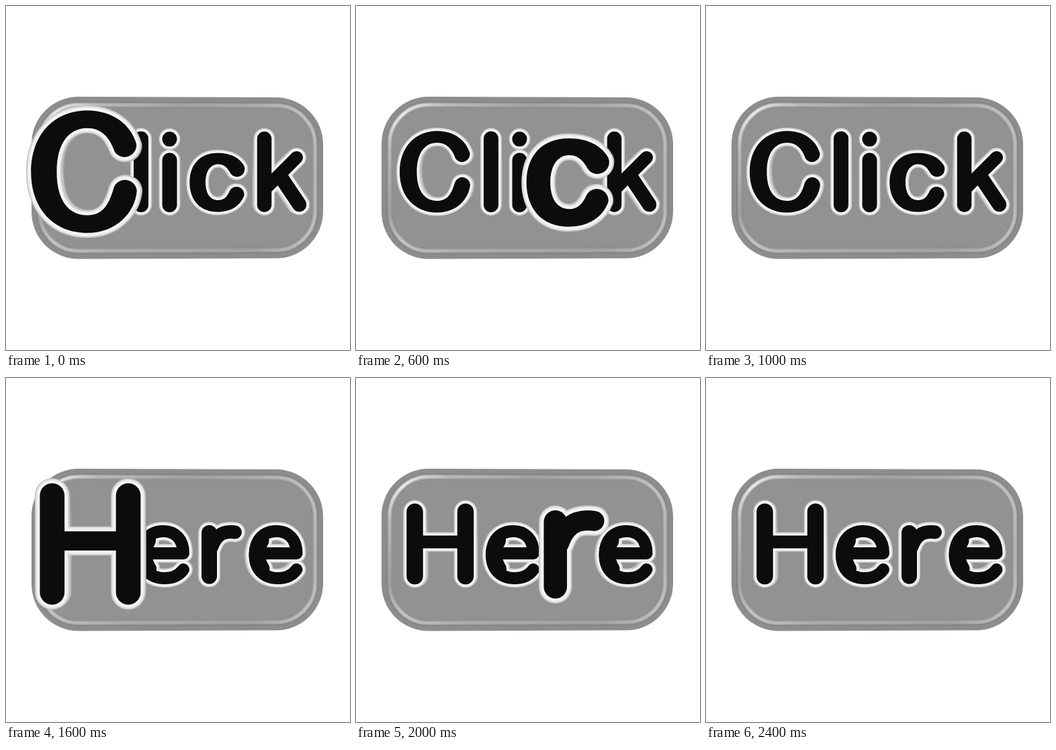
An HTML page with a canvas that plays this animation: 512x512 px, repeating every 3 s.

```html
<!DOCTYPE html>
<html lang="en">
<head>
<meta charset="utf-8">
<title>Click Here</title>
<style>
  html, body { margin: 0; width: 100%; height: 100%; overflow: hidden; background: #fff; }
  canvas { display: block; }
</style>
</head>
<body>
<canvas id="stage" width="512" height="512" role="img" aria-label="Click Here"></canvas>
<script>
const ctx = document.getElementById('stage').getContext('2d');
const LOOP = 3000, STEP = 200, HERE_START = 1600, POP = 1.5;
const VANISH = [256, 250], DEPTH = 0.03, LAYERS = 10;

// A letter is its pop centre plus round-capped strokes of [width, path]; width 0 means a filled outline.
const letter = (cx, cy, ...strokes) => ({
  cx, cy, strokes: strokes.map(([width, d]) => ({ width, path: new Path2D(d) }))
});

const letterE = dx => letter(233 + dx, 262.5,
  [18, `M${208 + dx} 261h56c0 -21 -12 -33 -30 -33c-20 0 -32 14 -32 35c0 22 13 35 34 35c14 0 23 -6 28 -13`],
  [24, `M${211 + dx} 242q-12 21 1 42`]);

const click = [
  letter(120.5, 247, [0, `M148 227C143 212 134 203.5 121 203.5C102 203.5 90.5 219 90.5 247C90.5 275 102 290 121 290
    C135 290 142 281 147 263A11.8 11.8 0 0 1 170 266C168 288 149 307.5 121 307.5C87 307.5 65 283 65 247
    C65 211 87 186 121 186C146 186 164 200 169.5 219A11.8 11.8 0 0 1 148 227Z`]),
  letter(201, 247, [22, 'M201 197.5V296']),
  letter(243.5, 247, [22, 'M243.5 198v.1M243.5 229.5V296']),
  letter(312.5, 262.5, [0, `M333 247C328 239 323 235.5 316 235.5C304 235.5 297 246 297 262.5C297 279 304 289 316 289
    C324 289 329 284 333 275A11.5 11.5 0 0 1 354.5 282C349 297 335 306.5 315 306.5C289 306.5 273.3 289 273.3 262.5
    C273.3 236 289 218.8 315 218.8C334 218.8 348 226 354.5 238A11.5 11.5 0 0 1 333 247Z`]),
  letter(410, 247, [21.5, 'M384.5 197.5V296M408 253L436.5 295.5'], [19, 'M432.5 225.5L388 270'])
];

const here = [
  letter(125, 247, [24.5, 'M87.5 199V295M163 199V295'], [19, 'M87.5 244H163']),
  letterE(0),
  letter(314, 263, [23, 'M302.5 230.5V295'], [20, 'M306 252C312 235 322 227 341 229.5']),
  letterE(168.5)
];

const gray = v => `rgb(${v},${v},${v})`;

function paintLetter({ cx, cy, strokes }, scale, depth, color, extra) {
  const near = 1 - depth;
  ctx.save();
  ctx.translate(VANISH[0] * depth, VANISH[1] * depth);
  ctx.scale(near, near);
  ctx.translate(cx, cy);
  ctx.scale(scale, scale);
  ctx.translate(-cx, -cy);
  ctx.strokeStyle = ctx.fillStyle = color;
  for (const { width, path } of strokes) {
    if (!width) ctx.fill(path);
    if (width + extra) {
      ctx.lineWidth = width + extra;
      ctx.stroke(path);
    }
  }
  ctx.restore();
}

// The sides facing down at the top of a letter are in shade.
function sideShade({ cy }, front) {
  const shade = ctx.createLinearGradient(0, cy - 42, 0, cy + 10);
  shade.addColorStop(0, gray(140 + 30 * front));
  shade.addColorStop(1, gray(146 + 82 * front));
  return shade;
}

function drawLetter(shape, scale) {
  for (let i = LAYERS; i > 0; i--) {
    paintLetter(shape, scale, DEPTH * i / LAYERS, sideShade(shape, 1 - i / LAYERS), 9);
  }
  paintLetter(shape, scale, 0, '#c4c4c4', 10);
  paintLetter(shape, scale, 0, '#e4e4e4', 8);
  paintLetter(shape, scale, 0, '#f4f4f4', 5.5);
  paintLetter(shape, scale, 0, '#0c0c0c', 0);
}

// The plate is slightly taller on its left side.
function plate(inset) {
  const left = 38 + inset, right = 472 - inset, radius = 70 - inset;
  ctx.beginPath();
  ctx.moveTo(255, 135.5 + inset);
  ctx.arcTo(right, 136.3 + inset, right, 256, radius);
  ctx.arcTo(right, 375.3 - inset, 255, 376 - inset, radius);
  ctx.arcTo(left, 376.8 - inset, left, 256, radius);
  ctx.arcTo(left, 134.8 + inset, 255, 135.5 + inset, radius);
  ctx.closePath();
}

function strokePlate(inset, width, color) {
  plate(inset);
  ctx.lineWidth = width;
  ctx.strokeStyle = color;
  ctx.stroke();
}

const rim = ctx.createConicGradient(0, 255, 255);
[[0, '#b8b8b8'], [.075, '#c4c4c4'], [.12, '#a4a4a4'], [.25, '#ababab'], [.37, '#b0b0b0'],
 [.425, '#c8c8c8'], [.46, '#a0a0a0'], [.53, '#bcbcbc'], [.575, '#f0f0f0'], [.62, '#bcbcbc'],
 [.75, '#a4a4a4'], [.87, '#acacac'], [.925, '#c4c4c4'], [1, '#b8b8b8']]
  .forEach(stop => rim.addColorStop(...stop));

function drawButton() {
  ctx.fillStyle = '#8d8d8d';
  plate(0);
  ctx.fill();
  strokePlate(8, 1.5, '#7e7e7e');
  ctx.filter = 'blur(1px)';
  strokePlate(12, 5, rim);
  ctx.filter = 'none';
  ctx.fillStyle = '#929292';
  plate(17);
  ctx.fill();
}

function draw() {
  const time = performance.now() % LOOP;
  const word = time < HERE_START ? click : here;
  const popped = word[Math.floor((time - (word === here ? HERE_START : 0)) / STEP)];
  ctx.clearRect(0, 0, 512, 512);
  ctx.lineCap = ctx.lineJoin = 'round';
  drawButton();
  for (const shape of word) if (shape !== popped) drawLetter(shape, 1);
  if (popped) drawLetter(popped, POP);
  requestAnimationFrame(draw);
}
draw();
</script>
</body>
</html>
```
